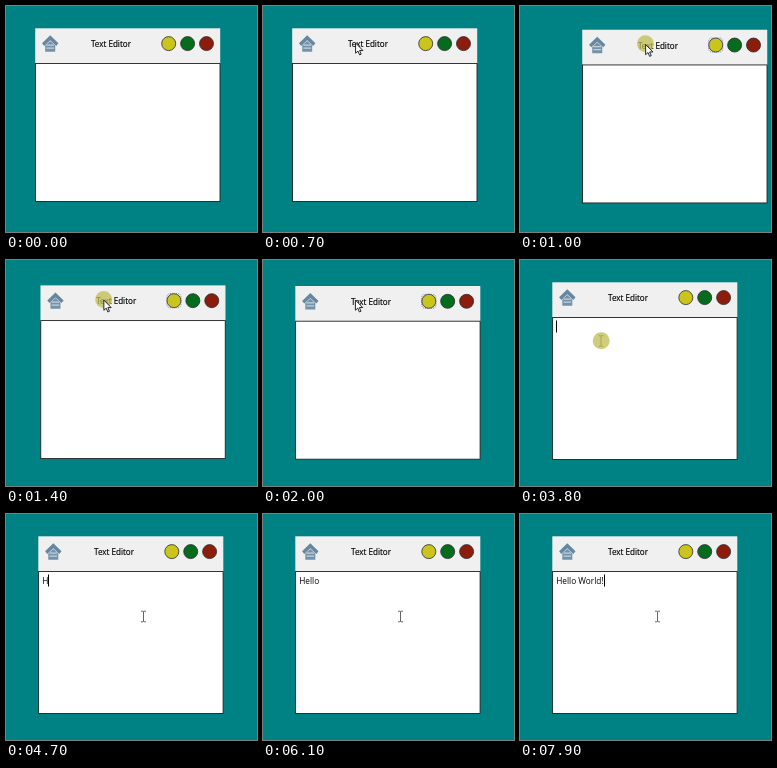
Animation of 251x226 px, one loop 8 s. Source, as an HTML page:

```html
<!DOCTYPE html>
<html lang="en">
<head>
<meta charset="utf-8">
<title>Text Editor</title>
<style>
  html, body { margin: 0; width: 100%; height: 100%; overflow: hidden; background: #008284; }
  svg { display: block; width: 100%; height: 100%; }
  text { font-family: "Open Sans", "Noto Sans", sans-serif; fill: #000; white-space: pre; }
  .title { font-size: 8.1px; stroke: #000; stroke-width: .15; }
  .lamp { stroke: #2a2a2a; stroke-width: .8; }
</style>
</head>
<body>
<svg viewBox="0 0 251 226">
  <rect width="251" height="226" fill="#008284"/>
  <rect id="bar" fill="#f0f0f0" width="185" height="36"/>
  <rect id="page" fill="#fff" stroke="#222" stroke-width=".9" width="184.5"/>
  <g id="content">
    <path d="M6.8 15.2 15 7.2 23.2 15.2 21 17.8 15 12.2 9 17.8Z" fill="#67869f"/>
    <path d="M10 17.4 15 12.8 20 17.4V23.6H10Z" fill="#7591a8"/>
    <path d="M11.2 17H18.8M11.2 20H18.8" stroke="#bdd3df" stroke-width="1.2"/>
    <text class="title" x="55.7" y="19">Text Editor</text>
    <circle class="lamp" cx="133.5" cy="15.5" r="7" fill="#c9c51c"/>
    <circle class="lamp" cx="152.4" cy="15.5" r="7" fill="#046c1c"/>
    <circle class="lamp" cx="171.3" cy="15.5" r="7" fill="#8c1c0c"/>
    <rect id="focus" x="126.5" y="8.5" width="14" height="14" rx="3"
          fill="none" stroke="#5a6a96" stroke-width=".8" stroke-dasharray="1 1"/>
  </g>
  <text id="typed" x="36.2" y="70" font-size="8.3"></text>
  <rect id="caret" y="60.5" width="1" height="12"/>
  <g id="pointer">
    <path id="beam" d="M-2.5-5.3H-.6L0-4.8.6-5.3H2.5M-2.5 5.3H-.6L0 4.8.6 5.3H2.5M0-5V5"
          fill="none" stroke="#555" stroke-width=".9"/>
    <circle id="press" cx=".2" cy="-.2" r="8.5" fill="#c0be50" fill-opacity=".75"/>
    <path id="arrow" d="M.4.4V10.6L2.8 8.5 4.4 12.3 6 11.6 4.4 7.9H7.7Z"
          fill="#fff" stroke="#111" stroke-width=".9"/>
  </g>
</svg>
<script>
const LOOP = 8000, STEP = 100, KEY_GAP = 200;
const GRIP = { x: 63, y: 14.3 };

// What the user does, in ms
const drag = { from: 900, to: 1900 };
const resize = { from: 2900, to: 3200 };
const click = { from: 3800, to: 4000 };
const bursts = [
  { at: 4600, keys: "H" }, { at: 5100, keys: "ello" }, { at: 6000, keys: " " },
  { at: 6400, keys: "World" }, { at: 7900, keys: "!" }
];

const home = { x: 29.2, y: 22.3 };
const rest = { x: 32.3, y: 26 };
const corner = { x: 35.5, y: 28 };
const onPage = { x: 81, y: 81 };

// Each move glides from the previous place to its own
const windowMoves = [
  { from: 0, to: 0, ...home },
  { from: 800, to: 1100, x: 63.5, y: 23.8 },
  { from: 1100, to: 1500, x: 34, y: 25.4 },
  { from: 1600, to: 1800, ...rest },
  { from: 2800, to: resize.to, x: rest.x, y: home.y }
];
const pointerMoves = [
  { from: 0, to: 0, x: 18, y: 43 },
  { from: 400, to: 700, x: home.x + GRIP.x, y: home.y + GRIP.y },
  { from: 800, to: drag.to, x: rest.x + GRIP.x, y: rest.y + GRIP.y },
  { from: drag.to, to: 2600, ...corner },
  { from: 2900, to: resize.to, x: corner.x, y: corner.y - 2 },
  { from: 3300, to: 3700, ...onPage },
  { from: click.to - STEP, to: 4200, x: 137.5, y: 102.5 }
];

const easeOut = k => 1 - (1 - k) ** 3;
const easeInOut = k => k * k * (3 - 2 * k);
const during = (action, t) => t >= action.from && t < action.to;

const el = id => document.getElementById(id);
const set = (id, attrs) => {
  for (const name in attrs) el(id).setAttribute(name, attrs[name]);
};
const show = (id, on) => set(id, { visibility: on ? "visible" : "hidden" });

function place(moves, t, ease) {
  let { x, y } = moves[0];
  for (const move of moves.slice(1)) {
    if (t <= move.from) break;
    const k = ease(Math.min(1, (t - move.from) / (move.to - move.from)));
    x += (move.x - x) * k;
    y += (move.y - y) * k;
  }
  return { x, y };
}

function drawWindow(t) {
  const { x, y } = place(windowMoves, t, easeOut);
  const top = y + 35.2;
  const bottom = t < resize.from ? top + 138 : 199.5;
  set("bar", { x, y });
  set("page", { x: x + .3, y: top, height: bottom - top });
  set("content", { transform: `translate(${x} ${y - .2})` });
  show("focus", t >= drag.from && t < click.from);
  return { x, y };
}

function drawPointer(t, origin) {
  const spot = during(drag, t)
    ? { x: origin.x + GRIP.x, y: origin.y + GRIP.y }
    : place(pointerMoves, t, easeInOut);
  const visible = t >= 400;
  const overBar = t > resize.to && spot.y < 57;
  const arrow = t < 2600 || overBar;
  set("pointer", { transform: `translate(${spot.x} ${spot.y})` });
  show("arrow", visible && arrow);
  show("beam", visible && !arrow);
  show("press", [drag, resize, click].some(action => during(action, t)));
}

function drawText(t) {
  const typed = el("typed");
  const value = bursts.map(({ at, keys }) =>
    keys.slice(0, Math.max(0, Math.floor((t - at) / KEY_GAP) + 1))).join("");
  if (typed.textContent !== value) typed.textContent = value;
  const length = value ? typed.getComputedTextLength() : 0;
  const blinkedOff = (t - 2750) % 1650 < 200;
  set("caret", { x: Math.round(36.2 + length) });
  show("caret", t >= click.from && !blinkedOff);
}

const start = performance.now();
function render() {
  const elapsed = (performance.now() - start) % LOOP;
  const t = Math.floor(elapsed / STEP) * STEP;
  drawPointer(t, drawWindow(t));
  drawText(t);
  requestAnimationFrame(render);
}
render();
</script>
</body>
</html>
```
